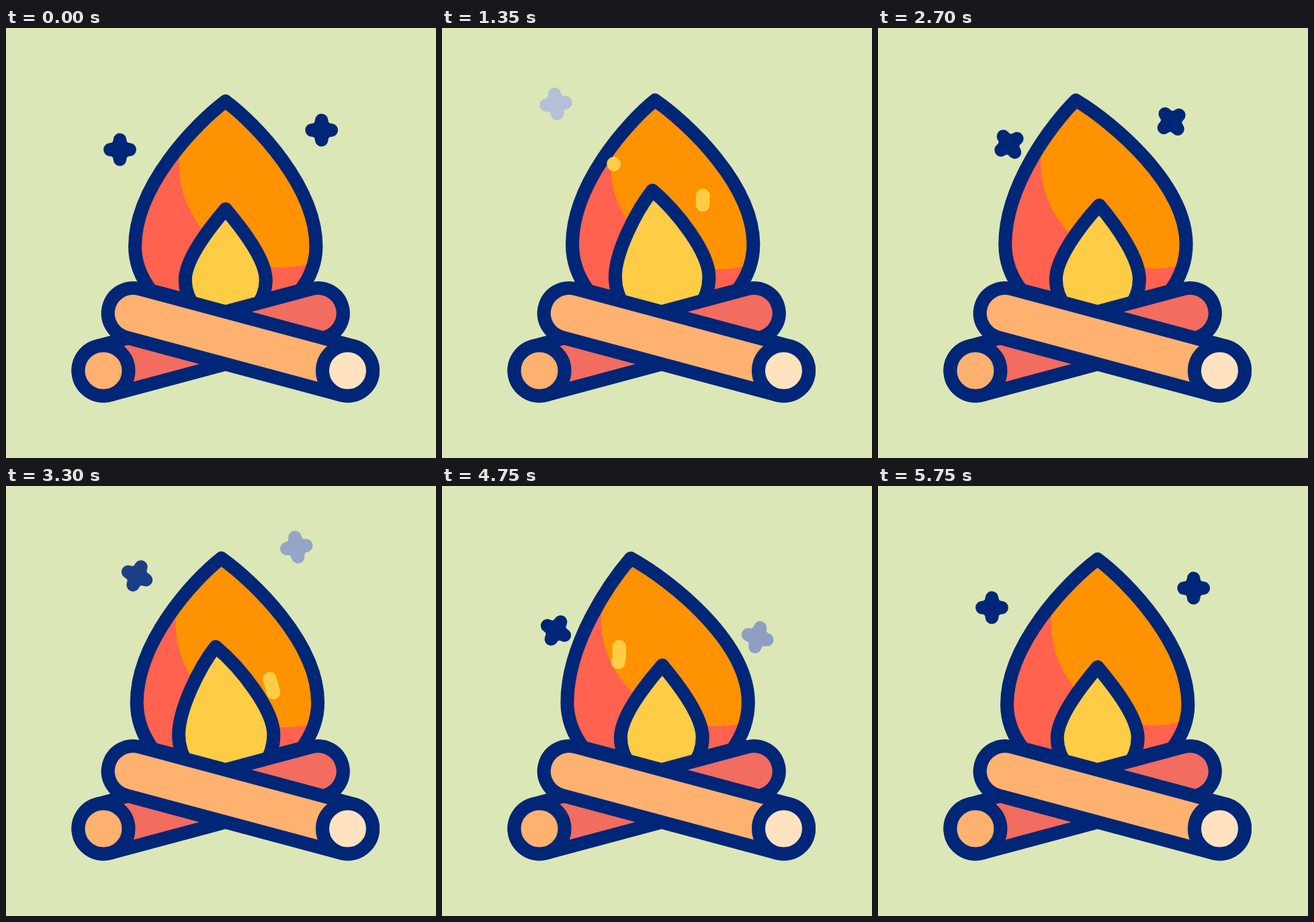
Write an HTML page with a canvas that moves like this. It is 640 by 640 pixels and loops after 5.8 s.

```html
<!DOCTYPE html>
<html lang="en">
<head>
<meta charset="utf-8">
<title>Campfire</title>
<style>
html, body { margin: 0; width: 100%; height: 100%; overflow: hidden; background: #dbe7b6; }
canvas { display: block; width: 640px; height: 640px; }
</style>
</head>
<body>
<canvas id="stage" width="640" height="640"></canvas>
<script>
const ctx = document.getElementById('stage').getContext('2d');
const LOOP = 5800, STEP = 50, SWAY = LOOP / 3, WRAP = LOOP - STEP;
const NAVY = '#002677', ORANGE = '#ff9200', RED = '#ff624f', YELLOW = '#ffcd45';
const MID = 326.75, SLOPE = Math.tan(Math.PI / 12);

const clamp = (v, lo, hi) => Math.max(lo, Math.min(hi, v));
const lerp = (a, b, k) => a + (b - a) * k;
const smooth = k => (1 - Math.cos(Math.PI * clamp(k, 0, 1))) / 2;

// Eased travel through key points [time, ...values]
function track(keys, t) {
  const i = keys.findIndex(key => key[0] > t);
  if (i < 0) return keys[keys.length - 1].slice(1);
  const a = keys[i - 1], b = keys[i];
  const k = smooth((t - a[0]) / (b[0] - a[0]));
  return a.slice(1).map((v, n) => lerp(v, b[n + 1], k));
}

const CALM_AT = 1885;
const OUTER_TIP = [[0, 0], [225, 33.5], [1020, -52], [1685, 33.5], [CALM_AT, 0]];
const INNER_TIP = [[0, 0, 0], [225, 8, 18.5], [1100, 0, 0], [1520, -21, 43], [CALM_AT, 0, 0]];

// Each star rises, turns and fades around the moment `at`; speeds are per second
const STARS = [
  { x: 169.5, y: 181, at: 0, birth: -1450, death: 1480, rise: 41, gain: 7, turn: 61, drift: 0 },
  { x: 469.7, y: 152, at: 0, birth: -1200, death: 1250, rise: 66, gain: -7, turn: 75, drift: 0 },
  { x: 195, y: 219, at: 2000, birth: 0, death: 1700, rise: 65.6, gain: 0, turn: -51, drift: 0 },
  { x: 444, y: 217.6, at: 1717, birth: 30, death: 1770, rise: 80, gain: 0, turn: 51, drift: -7.4 }
];
const FADE = 450;

// Each spark climbs a cosine path, its tail following with a delay
const SPARKS = [
  { starts: [290, 4036], x: 254.5, amp: 9.5, peak: 245, span: 92, bottom: 362, top: 202, speed: 0.172 },
  { starts: [635, 2880], x: 394.5, amp: -6.5, peak: 258, span: 72, bottom: 350, top: 249.5, speed: 0.15 }
];
const LAG = 135;

function outline() {
  ctx.strokeStyle = NAVY;
  ctx.lineWidth = 20;
  ctx.stroke();
}

function drawStar(star, t) {
  let ms = t - star.at;
  if (ms > star.death) ms -= WRAP;
  if (ms < star.birth) return;
  const a = clamp(Math.min(ms - star.birth, star.death - ms) / FADE, 0, 1);
  if (a < 0.12) return;
  const s = ms / 1000, r = 14.6;
  ctx.save();
  ctx.translate(star.x + star.drift * s, star.y - star.rise * s - star.gain * s * s);
  ctx.rotate(star.turn * s * Math.PI / 180);
  ctx.beginPath();
  ctx.moveTo(r, 0);
  for (let i = 0; i < 4; i++) {
    ctx.rotate(Math.PI / 2);
    ctx.quadraticCurveTo(1, -1, r, 0);
  }
  ctx.closePath();
  const rgb = [0, 38, 119].map(v => Math.round(lerp(255, v, a)));
  ctx.fillStyle = ctx.strokeStyle = `rgb(${rgb})`;
  ctx.lineWidth = 19.6;
  ctx.fill();
  ctx.stroke();
  ctx.restore();
}

// One side from the tip down to the foot; dir is -1 for left, 1 for right
function sidePoints(f, dir) {
  const x = MID + f.shift + dir * (f.half + (dir > 0 ? f.swell * 1.2 : f.swell));
  const floor = f.floor - dir * SLOPE * f.shift, h = floor - f.y;
  return [
    [f.tipX + dir * f.reach - f.twist, f.tipY + f.drop], [x, f.y - f.pull], [x, f.y],
    [x, f.y + 0.37 * h], [x - dir * 0.4 * f.inset, f.y + 0.72 * h], [x - dir * f.inset, floor]
  ];
}

function flamePath(f) {
  const l = sidePoints(f, -1), r = sidePoints(f, 1);
  const p = [...r, ...l.reverse(), [f.tipX, f.tipY]];
  const curve = i => ctx.bezierCurveTo(...p[i], ...p[i + 1], ...p[i + 2]);
  ctx.beginPath();
  ctx.moveTo(f.tipX, f.tipY);
  curve(0);
  curve(3);
  ctx.lineTo(MID, f.base);
  ctx.lineTo(...p[6]);
  curve(7);
  curve(10);
  ctx.closePath();
}

function drawOuter(s) {
  const [lean] = track(OUTER_TIP, s);
  const swing = smooth(s / 225) * smooth((CALM_AT - s) / 200);
  const shift = 0.21 * lean + 4 * swing;
  const flame = {
    tipX: MID + lean, tipY: 109 - 1.5 * swing, reach: 45, twist: 0.35 * lean, drop: 33.5,
    half: 134.7, swell: 0, shift, y: 325 - 3 * swing, pull: 89, inset: 24, floor: 391, base: 420
  };
  flamePath(flame);
  ctx.fillStyle = RED;
  ctx.fill();
  ctx.save();
  ctx.clip();
  ctx.beginPath();
  ctx.ellipse(411 + shift, 203 + 3 * swing + 0.05 * lean,
    153.5 + 6.5 * swing - 0.19 * lean, 153.5, -0.0026 * lean, 0, 2 * Math.PI);
  ctx.fillStyle = ORANGE;
  ctx.fill();
  ctx.restore();
  flamePath(flame);
  outline();
}

function drawInner(s) {
  const [lean, lift] = track(INNER_TIP, s);
  flamePath({
    tipX: MID + lean, tipY: 269.5 - lift, reach: 27 + 0.15 * lift, twist: 0.45 * lean, drop: 32,
    half: 60, swell: 0.32 * lift, shift: 0, y: 375 - 0.15 * lift, pull: 30 + 0.25 * lift,
    inset: 16, floor: 418, base: 445
  });
  ctx.fillStyle = YELLOW;
  ctx.fill();
  outline();
}

function drawSpark(spark, age) {
  const { x, amp, peak, span, bottom, top, speed } = spark;
  if (age < 0 || age > (bottom - top) / speed + LAG) return;
  const at = ms => clamp(bottom - speed * ms, top, bottom);
  const head = at(age), tail = at(age - LAG);
  ctx.beginPath();
  for (let i = 0; i <= 6; i++) {
    const y = lerp(tail + 0.01, head, i / 6);
    ctx.lineTo(x + amp * Math.cos((y - peak) / span * Math.PI), y);
  }
  ctx.strokeStyle = YELLOW;
  ctx.lineWidth = 20.5;
  ctx.stroke();
}

function drawLog(dir, body, end) {
  const R = 37.5, tilt = Math.PI / 12;
  ctx.save();
  ctx.translate(MID, 0);
  ctx.scale(dir, 1);
  ctx.beginPath();
  ctx.arc(-137.5, 424.5, R, Math.PI / 2 + tilt, 1.5 * Math.PI + tilt);
  ctx.arc(181.75, 510, R, -Math.PI / 2 + tilt, Math.PI / 2 + tilt);
  ctx.closePath();
  ctx.fillStyle = body;
  ctx.fill();
  outline();
  ctx.beginPath();
  ctx.arc(181.75, 510, R, 0, 2 * Math.PI);
  ctx.fillStyle = end;
  ctx.fill();
  outline();
  ctx.restore();
}

function draw(t) {
  ctx.fillStyle = '#dbe7b6';
  ctx.fillRect(0, 0, 640, 640);
  ctx.lineJoin = ctx.lineCap = 'round';
  STARS.forEach(star => drawStar(star, t));
  drawOuter(t % SWAY);
  drawInner(t % SWAY);
  SPARKS.forEach(spark => spark.starts.forEach(start => drawSpark(spark, t - start)));
  drawLog(-1, '#f26c5f', '#ffb170');
  drawLog(1, '#ffb170', '#ffe2c0');
}

const start = performance.now();
function tick() {
  const t = (performance.now() - start) % LOOP;
  draw(Math.floor(t / STEP) * STEP);
  requestAnimationFrame(tick);
}
tick();
</script>
</body>
</html>
```
